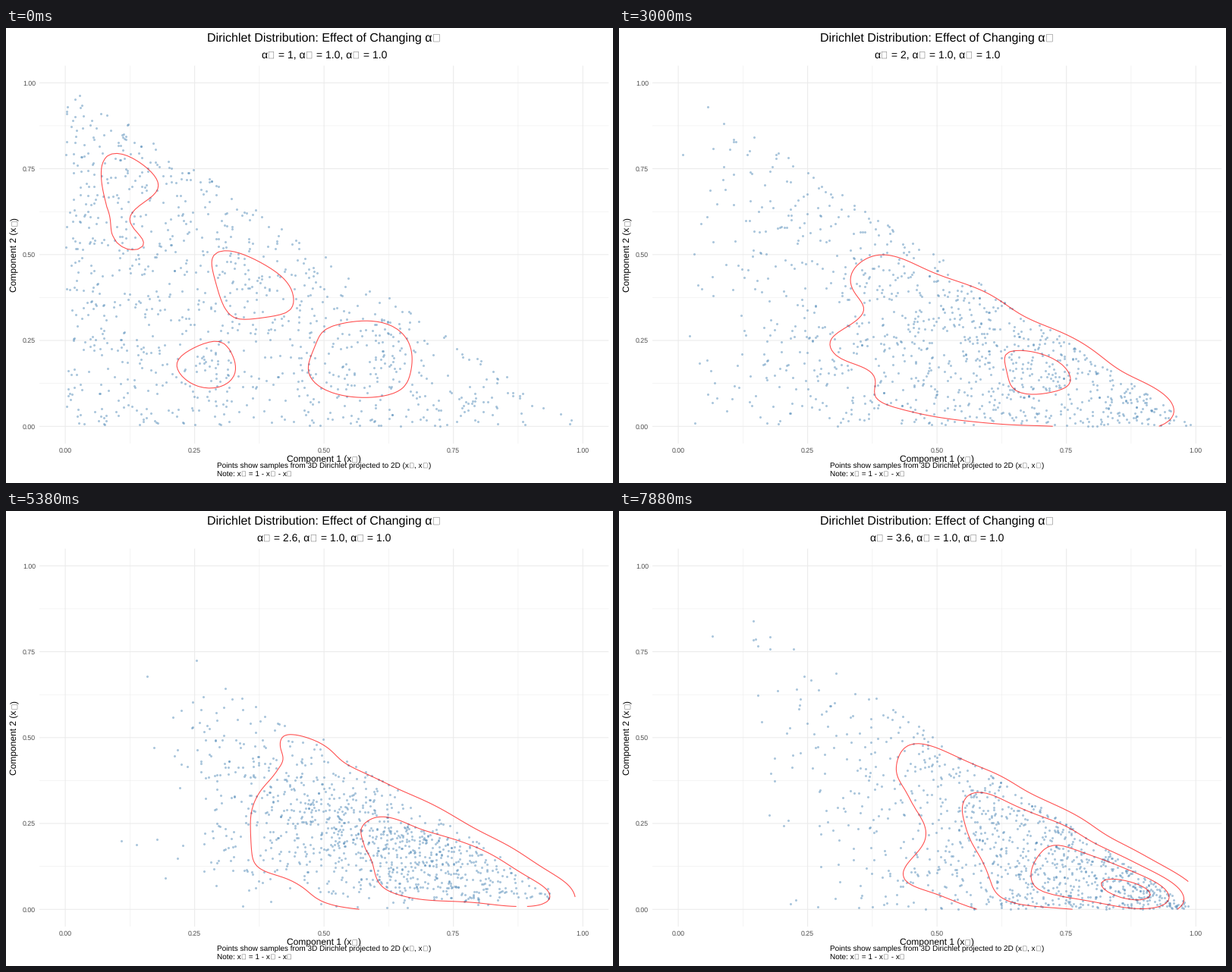
A matplotlib script that plays this animation: 800x600 px, repeating every 8 s.

```python
import numpy as np
import matplotlib.pyplot as plt
from matplotlib.animation import FuncAnimation
from matplotlib.collections import LineCollection
from matplotlib.patches import Rectangle

plt.rcParams["font.family"] = "Liberation Sans"
plt.rcParams["text.hinting"] = "none"

W, H = 800, 600
PT = 0.72  # points per pixel at 100 dpi
X0, Y0, XS, YS = 78.1, 525.3, 682.1, 453.0
LEFT, RIGHT, TOP, BOTTOM = 44, 794.2, 49.7, 548
MID = (LEFT + RIGHT) / 2
BOX = "\u25a1"  # stands for the missing subscript glyph
N = 1000

# Steps at which each state is reached and left again
ARRIVE = [0, 5, 10, 15, 20, 24, 29, 35, 39, 45, 50, 54, 59, 63]
LEAVE = [2, 7, 12, 17, 22, 27, 32, 37, 42, 47, 52, 56, 61, 63]
ALPHAS = [1 + 0.2 * i for i in range(len(ARRIVE))]


def to_px(x, y):
    return X0 + XS * x, Y0 - YS * y


def kernel(v, grid):
    """Gaussian kernels with the normal reference bandwidth."""
    q1, q3 = np.percentile(v, [25, 75])
    h = 1.06 * min(v.std(ddof=1), (q3 - q1) / 1.34) * len(v) ** -0.2
    return np.exp(-0.5 * ((grid[:, None] - v) / h) ** 2) / (h * np.sqrt(2 * np.pi))


def normalise(path, n=240):
    """Clockwise, loops starting at their lowest point, n even steps."""
    x, y = path.T
    if np.sum(x * np.roll(y, -1) - np.roll(x, -1) * y) < 0:
        path = path[::-1]
    if np.allclose(path[0], path[-1]):
        loop = np.roll(path[:-1], -np.argmax(path[:-1, 1]), axis=0)
        path = np.vstack([loop, loop[:1]])
    s = np.r_[0, np.cumsum(np.hypot(*np.diff(path, axis=0).T))]
    u = np.linspace(0, s[-1], n)
    return np.column_stack([np.interp(u, s, c) for c in path.T])


def density_paths(p):
    """Isolines of the 2D kernel density at 2, 4, 6 ..."""
    gx, gy = (np.linspace(c.min(), c.max(), 100) for c in p.T)
    z = kernel(p[:, 1], gy) @ kernel(p[:, 0], gx).T / len(p)
    cs = ax.contour(*to_px(gx, gy), z, levels=range(2, 12, 2))
    paths = []
    for segs in cs.allsegs:
        paths += sorted((s for s in segs if len(s) > 6), key=len, reverse=True)
    cs.remove()
    return [normalise(s) for s in paths]


def width(s, size):
    """Advance width in pixels; the bars keep outer spaces counted."""
    probe.set_fontsize(size * PT)
    ext = []
    for t in ("|" + s + "|", "||"):
        probe.set_text(t)
        ext.append(probe.get_window_extent(renderer).width)
    probe.set_text("")
    return ext[0] - ext[1]


def label(x, y, s, size, centre=True, up=False):
    """Text on a baseline, with thin empty boxes for the missing glyphs."""
    parts = s.split(BOX)
    sizes = [width(p, size) for p in parts]
    pos = -(sum(sizes) + 0.75 * size * (len(parts) - 1)) / 2 if centre else 0
    made = []
    for i, (part, w) in enumerate(zip(parts, sizes)):
        if part:
            at = (x, y - pos) if up else (x + pos, y)
            made.append(ax.text(*at, part, fontsize=size * PT, va="baseline", ha="left",
                                rotation=90 if up else 0, rotation_mode="anchor"))
        pos += w
        if i < len(parts) - 1:
            a, bw, bh = pos + 0.133 * size, 0.484 * size, 0.61 * size
            if up:
                frame = Rectangle((x - bh, y - a - bw), bh, bw)
            else:
                frame = Rectangle((x + a, y - bh), bw, bh)
            frame.set(fill=False, ec="black", lw=0.28 * PT, snap=False)
            made.append(ax.add_patch(frame))
            pos += 0.75 * size
    return made


def state_at(f):
    """Current state and progress towards the next one."""
    k = max(i for i, a in enumerate(ARRIVE) if a <= f)
    if f <= LEAVE[k]:
        return k, 0.0
    return k, (f - LEAVE[k]) / (ARRIVE[k + 1] - LEAVE[k])


fig = plt.figure(figsize=(W / 100, H / 100), dpi=100, facecolor="white")
ax = fig.add_axes([0, 0, 1, 1])
ax.axis("off")
renderer = fig.canvas.get_renderer()
probe = ax.text(0, 0, "")

rng = np.random.default_rng(7)
samples = [rng.dirichlet([a, 1, 1], N)[:, :2] for a in ALPHAS]
clouds = [np.column_stack(to_px(*p.T)) for p in samples]
contours = [density_paths(p) for p in samples]

ax.set_xlim(0, W)
ax.set_ylim(H, 0)

# Grid and tick labels
for i in range(9):
    v = i / 8
    gx, gy = to_px(v, v)
    style = dict(color="#ebebeb", lw=(0.53 if i % 2 else 1.07) * PT, snap=False,
                 zorder=0.5, solid_capstyle="butt")
    ax.plot([gx, gx], [TOP, BOTTOM], **style)
    ax.plot([LEFT, RIGHT], [gy, gy], **style)
    if i % 2 == 0:
        tick = dict(fontsize=8.8 * PT, color="#4d4d4d", va="baseline")
        ax.text(gx, 560, f"{v:.2f}", ha="center", **tick)
        ax.text(39, gy + 3.2, f"{v:.2f}", ha="right", **tick)

label(MID, 18, f"Dirichlet Distribution: Effect of Changing α{BOX}", 16)
label(MID, 573, f"Component 1 (x{BOX})", 12)
label(15, 299, f"Component 2 (x{BOX})", 12, up=True)
label(278, 580, f"Points show samples from 3D Dirichlet projected to 2D (x{BOX}, x{BOX})",
      10, centre=False)
label(278, 591, f"Note: x{BOX} = 1 - x{BOX} - x{BOX}", 10, centre=False)
subtitles = [label(MID, 40, f"α{BOX} = {a:.2g}, α{BOX} = 1.0, α{BOX} = 1.0", 14)
             for a in ALPHAS]

dots = ax.scatter(*clouds[0].T, s=(2.2 * PT) ** 2, c="steelblue", edgecolors="steelblue",
                  linewidths=0.75 * PT, alpha=0.4, zorder=2)
lines = LineCollection([], colors="red", alpha=0.7, linewidths=1.07 * PT, zorder=3)
ax.add_collection(lines, autolim=False)


def update(f):
    k, t = state_at(f)
    nxt = min(k + 1, len(ALPHAS) - 1)
    near = nxt if t >= 0.5 else k
    dots.set_offsets((1 - t) * clouds[k] + t * clouds[nxt])
    if t == 0:
        paths = contours[k]
    else:
        paths = [(1 - t) * a + t * b for a, b in zip(contours[k], contours[nxt])]
        paths += contours[near][len(paths):]
    lines.set_segments(paths)
    for i, group in enumerate(subtitles):
        for art in group:
            art.set_visible(i == near)
    return [dots, lines]


anim = FuncAnimation(fig, update, frames=64, interval=125, repeat=True, repeat_delay=0)
plt.show()
```
